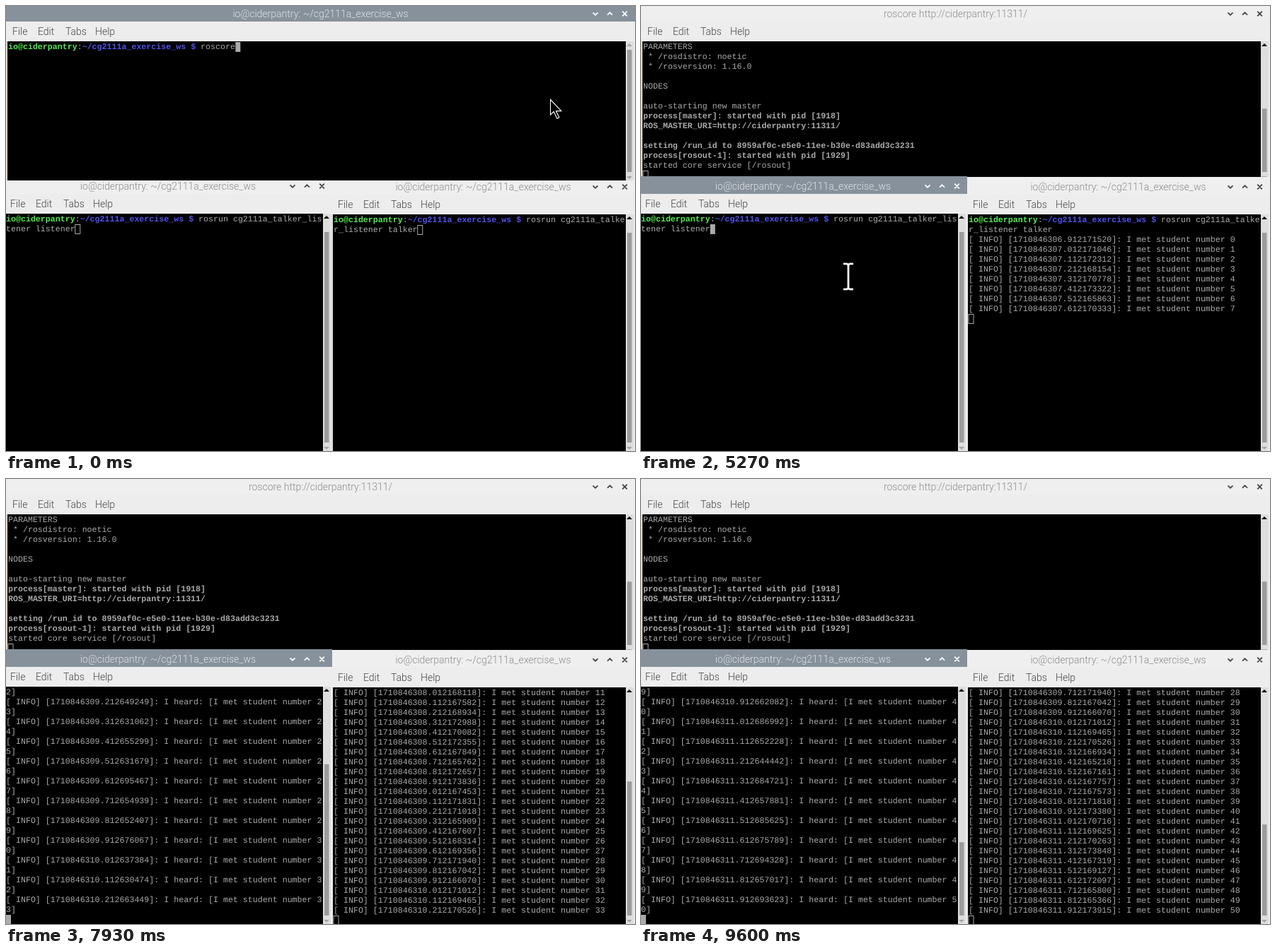
Recreate the animation shown at these times as an HTML page. Size 889 by 630 pixels, loop 9.67 s.

```html
<!DOCTYPE html>
<html lang="en">
<head>
<meta charset="utf-8">
<title>Talker and listener</title>
<style>
  html, body { margin: 0; width: 100%; height: 100%; overflow: hidden; background: #000; }
  svg { display: block; }
  text { white-space: pre; }
  .ui { font: 300 14px Roboto, sans-serif; }
  .term { font: 11.64px "Liberation Mono", monospace; fill: #aaa; text-rendering: geometricPrecision; }
  .bold { font-weight: bold; }
  .user { font-weight: bold; fill: #52ee52; }
  .path { font-weight: bold; fill: #5252ee; }
</style>
</head>
<body>
<svg id="stage" width="889" height="630" viewBox="0 0 889 630"></svg>
<script>
const stage = document.getElementById('stage');
const LOOP = 9670, FRAME = 200 / 3, CELL = 6.985, ROW = 14;

const HOST = 'ciderpantry', USER = 'io@' + HOST, DIR = '~/cg2111a_exercise_ws';
const PROMPT = `${USER}:${DIR} $ `;
const SHELL_TITLE = `${USER}: ${DIR}`;
const RUN_ID = '8959af0c-e5e0-11ee-b30e-d83add3c3231';

// Output of roscore arrives in three bursts.
const bursts = [
  { at: 1200, span: 130, title: 'roscore',
    text: `... logging to /home/io/.ros/log/${RUN_ID}/roslaunch-${HOST}-1908.log
Checking log directory for disk usage. This may take a while.
Press Ctrl-C to interrupt
Done checking log file disk usage. Usage is <1GB.` },
  { at: 1530, span: 340, title: 'roscore',
    text: `
started roslaunch server http://${HOST}:38439/
ros_comm version 1.16.0


SUMMARY
========

PARAMETERS
 * /rosdistro: noetic
 * /rosversion: 1.16.0

NODES

auto-starting new master
process[master]: started with pid [1918]` },
  { at: 2400, span: 130, title: `roscore http://${HOST}:11311/`,
    text: `ROS_MASTER_URI=http://${HOST}:11311/

setting /run_id to ${RUN_ID}
process[rosout-1]: started with pid [1929]
started core service [/rosout]` }
];

// mid: centre of the title bar; history: lines already scrolled away
const windows = {
  top: { x: 0, right: 889, mid: 11, bottom: 247, history: 0, edge: '#dcc3a8' },
  left: { x: -3, right: 461, mid: 255, bottom: 630, history: 1, edge: '#cfcfcf' },
  right: { x: 460, right: 889, mid: 256, bottom: 630, history: 1, edge: '#cfcfcf' }
};
for (const win of Object.values(windows)) {
  win.term = { x: win.x + 2, y: win.mid + 39 };
  win.bar = win.right - 13;
  win.rows = Math.round((win.bottom - win.term.y) / ROW);
  win.cols = Math.floor((win.bar - win.term.x) / CELL);
}

const glides = [
  { at: 400, end: 800, x: 774, y: 150, sag: 0 },
  { at: 1200, end: 1330, x: 781, y: 179, sag: 0 },
  { at: 1530, end: 1870, x: 690.5, y: 369, sag: 0 },
  { at: 4200, end: 4730, x: 293, y: 383, sag: 220 }
];

const reached = (time, now) => now + 5 >= time;
const clamp = v => Math.min(1, Math.max(0, v));
const progress = (at, span, now) => clamp((now - at + FRAME) / (span + FRAME));
const ease = u => u * u * (3 - 2 * u);
const noise = n => { const v = Math.sin(n * 12.9898) * 43758.5453; return v - Math.floor(v); };
const escapeText = s => s.replace(/&/g, '&amp;').replace(/</g, '&lt;');
const rect = (x, y, w, h, fill, extra = '') =>
  `<rect x="${x}" y="${y}" width="${w}" height="${h}" fill="${fill}" ${extra}/>`;

const said = n => `I met student number ${n}`;
const wrap = (line, cols) => line.match(new RegExp(`.{1,${cols}}`, 'g')) || [''];

function stamp(n, base, spread) {
  const tail = Math.floor(base + spread * noise(n + base));
  return `[ INFO] [1710846${(306.912 + n / 10).toFixed(3)}${tail}]: `;
}

function coreSession(now) {
  const lines = [PROMPT + 'roscore'];
  for (const { at, span, text } of bursts) {
    if (!reached(at, now)) break;
    const all = text.split('\n');
    lines.push(...all.slice(0, Math.round(all.length * progress(at, span - 5, now))));
  }
  return reached(400, now) ? [...lines, ''] : lines;
}

function nodeSession(node, entered, first, firstAt, format, now) {
  const lines = [`${PROMPT}rosrun cg2111a_talker_listener ${node}`];
  const last = Math.floor((now - firstAt) / 100.1) + first;
  for (let n = first; n <= last; n++) lines.push(format(n));
  return reached(entered, now) ? [...lines, ''] : lines;
}

const sessions = {
  top: coreSession,
  left: now => nodeSession('listener', 5330, 19, 6472,
    n => stamp(n, 626000, 70000) + `I heard: [${said(n)}]`, now),
  right: now => nodeSession('talker', 3800, 0, 4530,
    n => stamp(n, 165000, 9000) + said(n), now)
};

function styled(line) {
  if (line.startsWith(PROMPT)) {
    return `<tspan class="user">${USER}</tspan>:<tspan class="path">${DIR} $</tspan> `
      + line.slice(PROMPT.length);
  }
  const bold = /^(process\[|ROS_MASTER|setting)/.test(line);
  return bold ? `<tspan class="bold">${line}</tspan>` : escapeText(line);
}

function terminal({ term, bar, bottom }, lines, active) {
  const row = lines.length - 1;
  const cx = 1 + lines[row].length * CELL, cy = 1 + row * ROW;
  const cursor = active ? rect(cx, cy, 7, 14, '#aaa')
    : rect(cx, cy + 0.5, 7, 13, 'none', 'stroke="#aaa"');
  const text = lines.map((line, i) => line &&
    `<text class="term" x="1" y="${11 + i * ROW}">${styled(line)}</text>`).join('');
  const w = bar - term.x, h = bottom - term.y;
  return `<svg x="${term.x}" y="${term.y}" width="${w}" height="${h}">`
    + rect(0, 0, w, h, '#000') + text + cursor + '</svg>';
}

function scrollbar({ term, bar, bottom, rows, history }, scroll) {
  const mid = bar + 5, stop = bottom - 12;
  const page = rows - history;
  const full = stop - term.y - 12 - ROW * history;
  const length = full * page / (page + scroll);
  return rect(bar, term.y, 11, bottom - term.y, '#dedede')
    + rect(mid - 3, stop - length, 6.5, length, '#9c9c9c')
    + `<path d="M${mid - 4} ${term.y + 7}l4 -4l4 4z" fill="${scroll + history ? '#000' : '#aaa'}"/>`
    + `<path d="M${mid - 4} ${bottom - 6}l4 4l4 -4z" fill="#a6a6a6"/>`;
}

function titleButtons(x, y, color) {
  return `<path fill="none" stroke="${color}" stroke-width="1.8"
    d="M${x - 45} ${y - 1.7}l3.5 3.5l3.5 -3.5M${x - 24.5} ${y + 1.7}l3.5 -3.5l3.5 3.5
    M${x - 3.3} ${y - 3.3}l6.6 6.6m0 -6.6l-6.6 6.6"/>`;
}

function menuBar(x, y) {
  return ['File', 'Edit', 'Tabs', 'Help'].map((label, i) =>
    `<text class="ui" fill="#444" x="${x + i * 39 - (i % 3 && 3)}" y="${y}">${label}</text>`).join('');
}

function drawWindow(name, now, active) {
  const win = windows[name];
  const { x, right, mid, bottom, term } = win;
  const lines = sessions[name](now).flatMap(line => wrap(line, win.cols));
  const scroll = Math.max(0, lines.length - win.rows);
  const burst = name === 'top' && bursts.filter(b => reached(b.at, now)).pop();
  const [back, ink, icon] = active ? ['#87919b', '#dfe2e5', '#fff'] : ['#f0efef', '#8c8c8c', '#444'];
  return rect(x, mid - 14, right - x, bottom - mid + 14, '#ededed')
    + rect(x, mid - 14, right - x, 25, back)
    + rect(x, term.y, 1, bottom - term.y, win.edge)
    + `<text class="ui" text-anchor="middle" fill="${ink}" x="${(x + right) / 2}"
        y="${mid + 4.7}">${burst ? burst.title : SHELL_TITLE}</text>`
    + titleButtons(win.bar - 1.5, mid, icon)
    + menuBar(x + 9, mid + 29.7)
    + terminal(win, lines.slice(scroll), active)
    + scrollbar(win, scroll);
}

function pointer(now) {
  if (!reached(70, now)) {
    return '<path d="M769.5 132.5v21.5l4.7 -4.5l4.6 9.8l3 -1.4l-4.4 -9.3h7.4z" fill="#000" stroke="#fff" stroke-width="1.1"/>';
  }
  if (reached(5330, now)) return '';
  let x = 770, y = 133;
  for (const glide of glides) {
    if (!reached(glide.at, now)) break;
    const u = ease(progress(glide.at, glide.end - glide.at - 5, now));
    x += (glide.x - x) * u;
    y += (glide.y - y) * u + glide.sag * Math.sin(Math.PI * u);
  }
  const beam = 'M-7 -18h4q3 0 3 3q0 -3 3 -3h4M0 -15v30M-7 18h4q3 0 3 -3q0 3 3 3h4';
  return `<g transform="translate(${x} ${y})" fill="none">
    <path d="${beam}" stroke="#777" stroke-width="3.6"/>
    <path d="${beam}" stroke="#fff" stroke-width="2"/></g>`;
}

// The clicked window takes the focus and comes to the front.
function draw(now) {
  const focus = reached(4930, now) ? 'left' : reached(2800, now) ? 'right' : 'top';
  const order = ['left', 'right', 'top'].filter(name => name !== focus);
  if (focus === 'left') order.reverse();
  stage.innerHTML = [...order, focus].map(name => drawWindow(name, now, name === focus)).join('')
    + pointer(now);
}

const start = performance.now();
let shownFrame = -1;
function tick() {
  const t = (performance.now() - start) % LOOP;
  const frame = Math.min(144, Math.floor((t + 4) / FRAME));
  if (frame !== shownFrame) {
    shownFrame = frame;
    draw(frame * FRAME);
  }
  requestAnimationFrame(tick);
}
tick();
</script>
</body>
</html>
```
